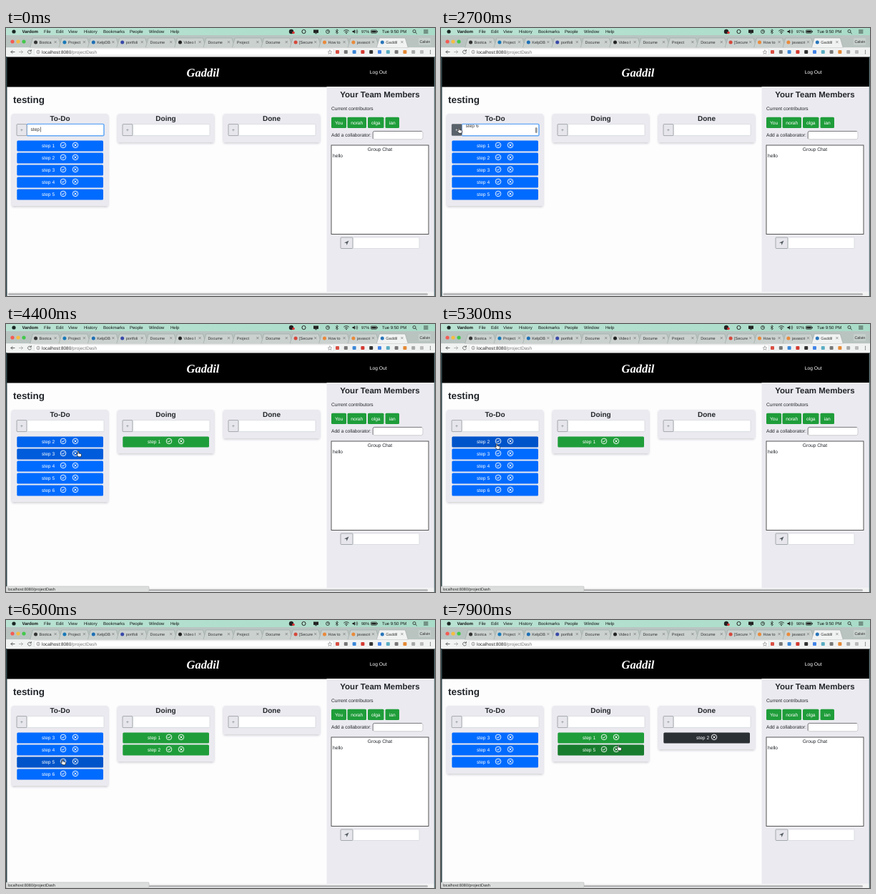
An HTML page for the animation above (8000 ms loop, 600 by 375 pixels).

```html
<!DOCTYPE html>
<html lang="en">
<head>
<meta charset="utf-8">
<title>Task board</title>
<style>
  html, body { margin: 0; width: 100%; height: 100%; overflow: hidden; background: #fdfdfe; }
  svg { display: block; width: 100vw; height: 100vh; }
  text { font-family: "Liberation Sans", Arial, sans-serif; text-rendering: geometricPrecision; white-space: pre; }
  .logo { font-family: "Liberation Serif", "Noto Serif", serif; font-style: italic; font-weight: bold; }
</style>
</head>
<body>
<svg viewBox="0 0 600 375">
  <defs>
    <linearGradient id="mint" x1="0" x2="1">
      <stop offset="0" stop-color="#b9e2d3"/><stop offset="1" stop-color="#a9dcc8"/>
    </linearGradient>
    <filter id="shadow" x="-10%" y="-10%" width="120%" height="130%">
      <feDropShadow dx="0" dy="1.5" stdDeviation="1.6" flood-color="#223" flood-opacity=".22"/>
    </filter>
    <clipPath id="field"><rect x="29.5" y="135" width="106.5" height="15.5"/></clipPath>
  </defs>
  <g id="frame"></g>
  <g id="page"></g>
  <g id="live"></g>
</svg>
<script>
const LOOP = 8000;
const INK = '#212529', BLUE = '#006bff', GREEN = '#1f9d3a', DARK = '#2b3035', PANEL = '#ebeaf0';
const byId = id => document.getElementById(id);

const rect = (x, y, w, h, fill, extra = '') =>
  `<rect x="${x}" y="${y}" width="${w}" height="${h}" fill="${fill}" ${extra}/>`;
const dot = (x, y, r, fill, extra = '') => `<circle cx="${x}" cy="${y}" r="${r}" fill="${fill}" ${extra}/>`;
const line = (d, color, width = 1, extra = '') =>
  `<path d="${d}" fill="none" stroke="${color}" stroke-width="${width}" stroke-linecap="round" ${extra}/>`;
const label = (x, y, str, size = 6.65, fill = INK, extra = '') =>
  `<text x="${x}" y="${y}" font-size="${size}" fill="${fill}" ${extra}>${str}</text>`;
const BOLD = 'font-weight="bold"', MID = 'text-anchor="middle"';

function menuBar() {
  const items = [['File', 53], ['Edit', 70], ['View', 87], ['History', 109], ['Bookmarks', 136],
    ['People', 173], ['Window', 200], ['Help', 230]];
  return rect(0, 0, 600, 10, 'url(#mint)') + dot(11, 5, 2.6, '#1a2522') +
    label(22.5, 7.2, 'Vardom', 6.1, '#111', BOLD) +
    items.map(([name, x]) => label(x, 7.2, name, 6, '#111')).join('') +
    dot(399, 5, 3.2, '#222') + dot(402, 6.5, 1.8, '#d33') +
    dot(416.5, 5, 2.6, 'none', 'stroke="#222"') +
    rect(430, 2.5, 7, 4.4, '#222') + rect(432, 7.4, 3, .8, '#222') +
    dot(450, 5, 2.5, 'none', 'stroke="#222" stroke-width=".8"') + line('M450 3.5V5h1.3', '#222', .7) +
    line('M461 3.5l3.6 3-1.8 1.6V1.8l1.8 1.6-3.6 3', '#222', .7) +
    line('M472.5 4a5 5 0 0 1 7 0M474 5.7a3 3 0 0 1 4 0', '#222', .9) + dot(476, 7.4, .8, '#222') +
    '<path d="M484.5 4h1.5l2-1.8v5.6L486 6h-1.5z" fill="#222"/>' +
    line('M489.5 3.5a2.5 2.5 0 0 1 0 3M491 2.5a4 4 0 0 1 0 5', '#222', .7) +
    rect(510.5, 3, 8, 4.2, 'none', 'stroke="#222" stroke-width=".7" rx=".7"') +
    rect(511.3, 3.8, 6.4, 2.6, '#222') + rect(519, 4.2, .8, 1.8, '#222') +
    label(526, 7.2, 'Tue 9:50 PM', 6, '#111') +
    dot(571, 4.5, 2, 'none', 'stroke="#222" stroke-width=".8"') + line('M572.6 6l1.8 1.8', '#222', .9) +
    line('M584.5 3h5.5M584.5 5h5.5M584.5 7h5.5', '#222', .8);
}

function tabs() {
  const list = [['Bootca', '#333'], ['Project', '#1778b8'], ['KelpDB', '#1d6fb5'], ['portfoli', '#3949a8'],
    ['Docume'], ['Video l', '#222'], ['Docume'], ['Project'], ['Docume'], ['[Secure', '#d5483b'],
    ['How to', '#e98a3a'], ['javascri', '#e98a3a'], ['Gaddil', '#2875b8']];
  let out = rect(0, 10, 600, 17.5, '#b9c4c1') +
    ['#f35b53', '#f5bd40', '#42c84b'].map((c, i) => dot(9 + i * 8, 19, 2.6, c)).join('');
  list.forEach(([name, icon], i) => {
    const x = 33.5 + i * 40.4, active = i === list.length - 1;
    out += `<path d="M${x} 27.5l4-13.5h36l4 13.5z" fill="${active ? '#f1f2f2' : '#cad1cf'}" stroke="#929c99" stroke-width=".5"/>`;
    if (icon) out += dot(x + 8, 20, 2.5, icon);
    out += label(x + (icon ? 13 : 6.5), 21.5, name, 5.5, '#333') +
      line(`M${x + 34.3} 18.3l2.6 2.6m0-2.6l-2.6 2.6`, '#666', .6);
  });
  return out + rect(577, 14, 17, 9.5, '#c7d0cd', 'rx="1.5"') + label(578.5, 21, 'Calvin', 5.3, '#222');
}

function toolbar() {
  const icons = ['#d95043', '#777', '#3b88d8', '#d33a32', '#333', '#4385e8', '#5aaec2',
    '#777', '#e48a37', '#a8a8a8', '#bbb'];
  return rect(0, 27.5, 600, 13, '#f1f2f2') +
    line('M12 33.5H7m2-2l-2 2 2 2', '#555', .9) + line('M18.5 33.5h5m-2-2l2 2-2 2', '#aaa', .9) +
    line('M35 32a2.5 2.5 0 1 0 .3 2.5M35.3 30.5v1.8h-1.8', '#555', .8) +
    rect(39.5, 29, 419, 9, '#fff', 'rx="1.5" stroke="#ccc" stroke-width=".5"') +
    dot(45, 33.5, 2.3, 'none', 'stroke="#666" stroke-width=".6"') + line('M45 33.2v1.5M45 32.2v.1', '#666', .6) +
    label(50, 35.6, 'localhost:8080<tspan fill="#777">/projectDash</tspan>', 6.4, '#222') +
    line('M453 31l.8 1.8 2 .2-1.5 1.3.5 2-1.8-1-1.8 1 .5-2-1.5-1.3 2-.2z', '#666', .5) +
    icons.map((c, i) => rect(461 + i * 11.8, 31, 5, 5, c, 'rx="1"')).join('') +
    [31.3, 33.5, 35.7].map(y => dot(593.5, y, .65, '#555')).join('');
}

function sidebar() {
  const people = [['You', 455, 21], ['norah', 477.5, 26.5], ['olga', 506, 22.5], ['ian', 530.5, 19.5]];
  return rect(448.5, 82, 151.5, 287.5, PANEL) +
    label(523, 97.4, 'Your Team Members', 11.5, INK, BOLD + ' ' + MID) +
    label(455, 115, 'Current contributors') +
    people.map(([name, x, w]) => rect(x, 124.7, w, 15.2, GREEN, 'rx="1.5"') +
      label(x + w / 2, 134.5, name, 6.65, '#fff', MID)).join('') +
    label(455, 152.3, 'Add a collaborator:') +
    rect(513, 144.3, 70, 11.5, '#fff', 'rx="2.5" stroke="#c4c4c8" stroke-width=".8"') +
    line('M513.2 154.5v-8q0-2 2-2h66', '#77777c', .9) +
    rect(455, 164, 136, 124.5, '#fff', 'stroke="#444" stroke-width=".9"') +
    label(523, 171.8, 'Group Chat', 6.65, INK, MID) + label(457, 181.2, 'hello') +
    rect(485, 293, 93, 15.5, '#fff', 'stroke="#d0d4d8" stroke-width=".7" rx="1"') +
    rect(468, 293, 17, 15.5, '#e6e6ec', 'stroke="#92989e" stroke-width=".8" rx="1"') +
    '<path d="M479.5 297.5l-6.5 3 3 .6.5 3z" fill="#555c63"/>';
}

byId('frame').innerHTML = menuBar() + tabs() + toolbar();
byId('page').innerHTML =
  rect(0, 82, 600, 288, '#fdfdfe') + rect(0, 40.5, 600, 42, '#000') +
  label(275.5, 67.5, 'Gaddil', 16.5, '#fff', 'class="logo" text-anchor="middle"') +
  label(508.8, 64, 'Log Out', 6.7, '#fff') +
  label(10, 105.3, 'testing', 13.4, INK, BOLD) + sidebar() +
  rect(0, 369.5, 600, 5.5, '#f2f2f3') + rect(3, 371, 587, 3, '#b9babb', 'rx="1.5"') +
  rect(0, 40, 1.5, 335, '#32494c') + rect(598.8, 40, 1.2, 335, '#61787a');

// Times of the user's actions, in ms.
const TYPE_SPACE = 300, TYPE_DIGIT = 700, ENTER = 1900, ADD = 2850;
const START_1 = 3850, START_2 = 5600, START_5 = 6700, FINISH_2 = 7450;
const STATUS = [[3600, 4150], [4350, 4800], [5100, 6000], [6300, 6850], [7150, LOOP]];
const PATH = [[2050, 62, 152], [2500, 26, 141], [2700, 25, 139.5], [2950, 25, 139.5], [3380, 66, 185],
  [3650, 79, 163], [3950, 79, 163], [4150, 86, 167], [4400, 101, 178], [4800, 101, 178], [5250, 78, 167.5],
  [6000, 78, 167.5], [6400, 79, 195], [6750, 79, 195], [7150, 228, 179], [7500, 228, 179], [7850, 248, 175]];

function pointer(t) {
  if (t < PATH[0][0]) return null;
  const i = PATH.findIndex(p => p[0] > t);
  if (i < 0) return PATH[PATH.length - 1].slice(1);
  const [t0, x0, y0] = PATH[i - 1], [t1, x1, y1] = PATH[i];
  const u = (t - t0) / (t1 - t0), e = u * u * (3 - 2 * u);
  return [x0 + (x1 - x0) * e, y0 + (y1 - y0) * e];
}

// Share of the last 150 ms that the pointer spent inside a box: a hover fade.
function hover(t, x, y, w, h) {
  let hits = 0;
  for (let k = 0; k < 6; k++) {
    const p = pointer(t - k * 30);
    if (p && p[0] >= x && p[0] <= x + w && p[1] >= y && p[1] <= y + h) hits++;
  }
  return hits / 6;
}

function board(t) {
  const cols = [[], [], []];
  for (let n = 1; n <= (t < ADD ? 5 : 6); n++) {
    let col = 0;
    if (n === 1 && t >= START_1) col = 1;
    if (n === 2 && t >= START_2) col = t >= FINISH_2 ? 2 : 1;
    if (n === 5 && t >= START_5) col = 1;
    cols[col].push(n);
  }
  return cols;
}

const ring = (x, y, mark) => dot(x, y, 3.8, 'none', 'stroke="#fff" stroke-width=".9"') +
  line(`M${x} ${y}${mark}`, '#fff', 1);
const CHECK = 'm-1.8 .1l1.3 1.3 2.3-2.6', CROSS = 'm-1.4-1.4l2.8 2.8m0-2.8l-2.8 2.8';

function item(t, n, col, slot) {
  const x = 15.3 + col * 148, y = 157.4 + slot * 17, cy = y + 6.5;
  const shade = hover(t, x, y - 1, 120.7, 17) * .21;
  const text = dx => label(x + dx, y + 9.5, 'step ' + n, 6.65, '#fff');
  return rect(x, y, 120.7, 15, [BLUE, GREEN, DARK][col], 'rx="1.5"') +
    rect(x, y, 120.7, 15, '#000', `rx="1.5" opacity="${shade}"`) +
    (col === 2 ? text(45.7) + ring(x + 70.7, cy, CROSS)
               : text(34.7) + ring(x + 64.7, cy, CHECK) + ring(x + 81.7, cy, CROSS));
}

function column(t, title, col, items) {
  const x = 8 + col * 148, count = items.length;
  const bottom = count ? 164 + 17 * count : 160;
  const typing = col === 0 && t < ADD;
  const over = col === 0 ? hover(t, 15, 134, 14, 17) : 0;
  const pressed = col === 0 && t >= ADD && t < START_1;
  return rect(x, 120, 135, bottom - 120, PANEL, 'rx="3" filter="url(#shadow)"') +
    label(x + 67.5, 130, title, 10, INK, BOLD + ' ' + MID) +
    rect(x + 21, 134.6, 108, 16, '#fff', `rx="1" stroke="${typing ? '#80bdff' : '#d0d4d8'}" stroke-width=".7"`) +
    (typing ? rect(x + 21, 134.4, 108, 16.4, 'none', 'rx="1.5" stroke="#65a9f5" stroke-width="1.4"') : '') +
    rect(x + 7, 134.6, 14, 16, '#e6e6ec', 'stroke="#92989e" stroke-width=".8" rx="1"') +
    rect(x + 7, 134.6, 14, 16, '#59616a', `rx="1" opacity="${over}"`) +
    (pressed ? rect(x + 6.7, 134.3, 14.6, 16.6, 'none', 'rx="1" stroke="#707b86" stroke-width="1.5"') : '') +
    label(x + 14, 144.8, '+', 6.65, over > .5 ? '#fff' : '#6c757d', MID) +
    items.map((n, slot) => item(t, n, col, slot)).join('');
}

function draft(t) {
  if (t >= ADD) return '';
  const str = t < TYPE_SPACE ? 'step' : t < TYPE_DIGIT ? 'step ' : 'step 6';
  const wrapped = t >= ENTER;
  const caretX = wrapped ? 35 : t < TYPE_SPACE ? 48 : t < TYPE_DIGIT ? 49.8 : 53.5;
  const blink = t < TYPE_DIGIT + 300 || (t - TYPE_DIGIT) % 1000 < 500;
  const caret = blink && t < 2500 ? rect(caretX, wrapped ? 143 : 138.5, .6, 7, '#222') : '';
  return `<g clip-path="url(#field)">${label(34.5, wrapped ? 139 : 144.3, str, 6.65, '#333')}${caret}</g>` +
    (wrapped ? rect(131.7, 139, 3, 8, '#9b9b9b', 'rx="1.5"') : '');
}

function hand(t) {
  const p = pointer(t);
  if (!p) return '';
  return `<path transform="translate(${p[0]} ${p[1]})" d="M-.8 .6q.8-1 1.6 0V3l2.8 .6q1 .3 .9 1.3L4 7.8H.4L-2.2 4.9q-.3-1 .6-.9l.8 .6z"
    fill="#fff" stroke="#111" stroke-width=".7" stroke-linejoin="round"/>`;
}

function status(t) {
  if (!STATUS.some(([a, b]) => t >= a && t < b)) return '';
  return rect(0, 367, 200, 8, '#dcdddd', 'stroke="#b0b2b2" stroke-width=".5" rx="1"') +
    label(2.5, 373, 'localhost:8080/projectDash', 5.5, '#222');
}

function render(t) {
  const cols = board(t);
  byId('live').innerHTML =
    label(497, 7.2, t < 5700 ? '97%' : '98%', 5.6, '#111') +
    ['To-Do', 'Doing', 'Done'].map((title, i) => column(t, title, i, cols[i])).join('') +
    draft(t) + status(t) + hand(t);
}

const start = performance.now();
function tick() {
  render((performance.now() - start) % LOOP);
  requestAnimationFrame(tick);
}
tick();
</script>
</body>
</html>
```
